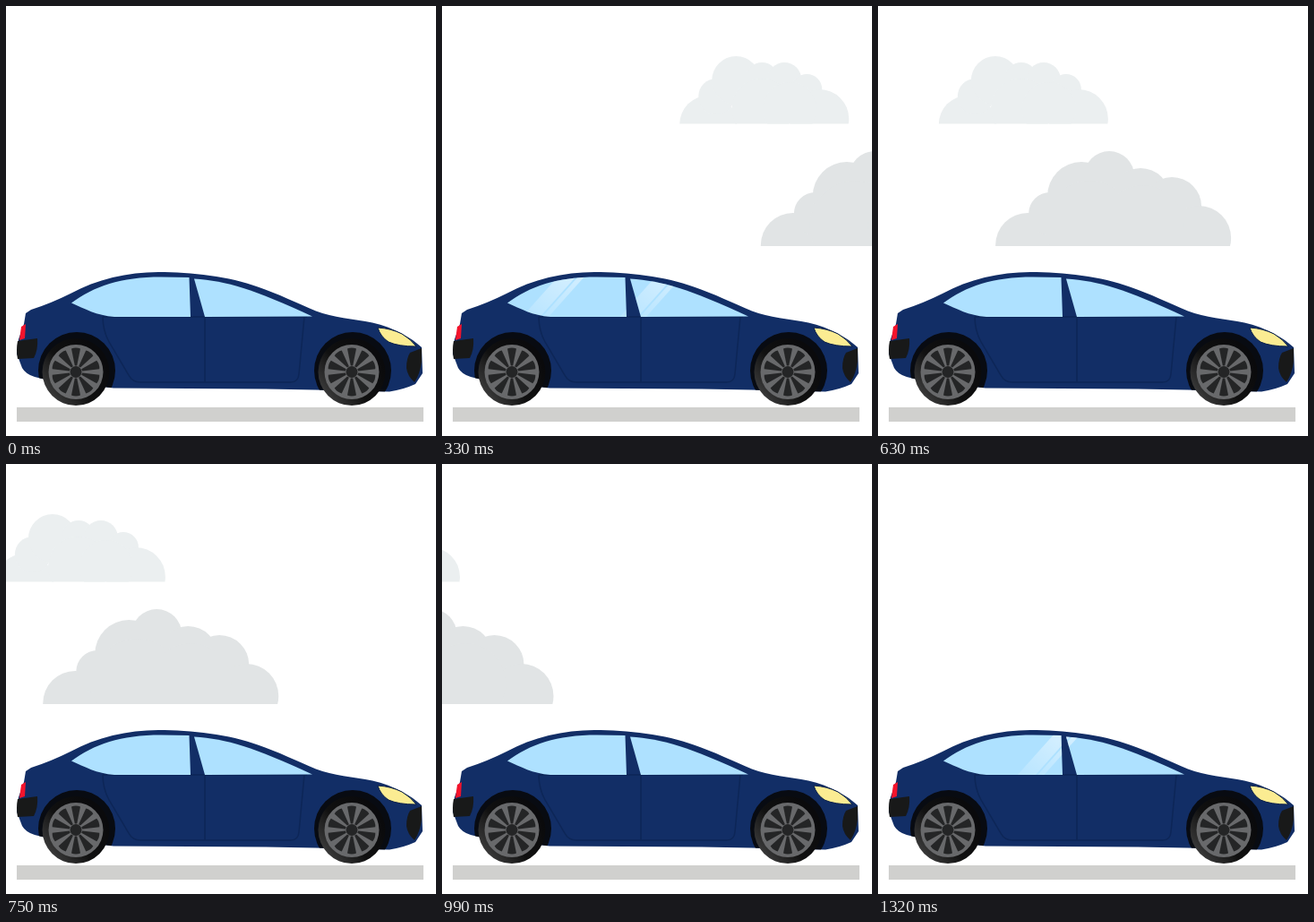
Recreate the animation shown at these times as an HTML page with a canvas. Size 480 px wide and 480 px high, loop 1.35 s.

```html
<!DOCTYPE html>
<html lang="en">
<head>
<meta charset="utf-8">
<title>Car and clouds</title>
<style>
html, body { margin: 0; width: 100%; height: 100%; overflow: hidden; background: #fff; }
canvas { display: block; width: 480px; height: 480px; }
</style>
</head>
<body>
<canvas id="stage" width="480" height="480"></canvas>
<script>
const ctx = document.getElementById('stage').getContext('2d');
const LOOP = 1350, STEP = 30;

const body = new Path2D(`M22 343 L28 339 Q50 332 72 321 C101 305 136 297 170 297
  C207 297 250 302 281 313.5 C303 321 326 332 346 340.5 C365 348 388 349 409 353.5
  C433 359 452 370 464 381 L465 410 L457 422 Q444 428 428 430.5 L345 428.5
  L290 427.5 L120 426.5 L40 416 L32 414 Q22 411 18 404 L12 388 L14 372 L20 355 Z`);
const rearWindow = new Path2D(`M73 331.5 C98 313 128 302.5 173 302.5 L204.5 303 L206 347
  L121 347 C101 345.5 88 338 73 331.5 Z`);
const frontWindow = new Path2D('M210 304.5 C247 307 276 316 342 346.5 L222 347 Z');
const doors = new Path2D(`M108 347 Q108 362 115 375 L137 412 Q141 420 150 420
  L318 420 Q326 420 327 411 L333 347 M222 347 V420 M108 347 H336`);
const rearBumper = new Path2D('M13 374 L35 371 Q36 384 31 393 L13 394 Q11 384 13 374 Z');
const frontBumper = new Path2D('M451 387 L464 382 L464 397 Q462 411 456 420 Q448 413 447 404 Q447 393 451 387 Z');
const tailLight = new Path2D('M15 373 L17 358 L22 355 L21 371 Z');
const headLight = new Path2D('M415 359 Q430 360 442 366 Q452 372 458 380 Q438 380 427 375 Q418 369 415 359 Z');

// Each puff is [x, y, radius], with x measured from the cloud's left edge.
const clouds = [
  { color: '#ebeff0', start: 482.4, speed: 0.658, base: 131.5,
    puffs: [[32, 132, 32], [41, 101, 20], [63, 83, 27], [92, 81, 18], [117, 82, 19],
            [142, 93, 17], [156, 126, 33], [92, 115, 34], [123, 115, 30]] },
  { color: '#e1e4e5', start: 603, speed: 0.749, base: 268,
    puffs: [[36, 267, 36], [61, 232, 24], [96, 212, 38], [127, 190, 28], [162, 214, 33],
            [197, 224, 33], [227, 259, 36], [105, 245, 50], [165, 245, 45]] }
];

function fill(path, color) {
  ctx.fillStyle = color;
  ctx.fill(path);
}

function disc(x, y, r, color) {
  ctx.fillStyle = color;
  ctx.beginPath();
  ctx.arc(x, y, r, 0, Math.PI * 2);
  ctx.fill();
}

function drawCloud({ color, start, speed, base, puffs }, t) {
  const left = start - speed * t;
  ctx.save();
  ctx.beginPath();
  ctx.rect(0, 0, 480, base);
  ctx.clip();
  for (const [x, y, r] of puffs) disc(left + x, y, r, color);
  ctx.restore();
}

// A slanted band of light; x is its centre halfway up the window.
function drawBand(x, width, alpha) {
  const gradient = ctx.createLinearGradient(x - 21, 347, x + 21, 300);
  gradient.addColorStop(0, `rgba(255,255,255,${alpha * 0.3})`);
  gradient.addColorStop(1, `rgba(255,255,255,${alpha})`);
  ctx.fillStyle = gradient;
  ctx.beginPath();
  ctx.moveTo(x - 21 - width / 2, 348);
  ctx.lineTo(x + 21 - width / 2, 301);
  ctx.lineTo(x + 21 + width / 2, 301);
  ctx.lineTo(x - 21 + width / 2, 348);
  ctx.fill();
}

function drawGlare(x, alpha) {
  drawBand(x - 4, 20, alpha);
  drawBand(x + 12, 7, alpha);
}

function drawReflections(t) {
  const panes = new Path2D(rearWindow);
  panes.addPath(frontWindow);
  ctx.save();
  ctx.clip(panes);
  if (t >= 60 && t <= 540) {
    const alpha = 0.45 * Math.min(1, (t - 30) / 90, (570 - t) / 90);
    drawGlare(98 + 0.17 * (t - 180), alpha);
    drawGlare(204 + 0.19 * (t - 180), alpha);
  } else if (t >= 1080) {
    drawGlare(169 + 0.1 * (t - 1110), 0.5);
  }
  ctx.restore();
}

function drawWheel(x, y) {
  const tyre = ctx.createLinearGradient(x - 30, y + 24, x + 25, y - 20);
  tyre.addColorStop(0, '#3a3a3a');
  tyre.addColorStop(0.45, '#101010');
  tyre.addColorStop(1, '#0a0a0c');
  disc(x, y, 37.5, tyre);
  disc(x, y, 30.5, '#68696b');
  ctx.save();
  ctx.translate(x, y);
  ctx.rotate(Math.PI / 10);
  ctx.fillStyle = '#242526';
  for (let i = 0; i < 10; i++) {
    ctx.beginPath();
    ctx.moveTo(7, -1.2);
    ctx.lineTo(26, -5);
    ctx.quadraticCurveTo(28, 0, 26, 5);
    ctx.lineTo(7, 1.2);
    ctx.fill();
    ctx.rotate(Math.PI / 5);
  }
  ctx.restore();
  disc(x, y, 6.5, '#242526');
}

function drawCar(t) {
  fill(body, '#122e66');
  ctx.strokeStyle = '#0d2657';
  ctx.lineWidth = 1.5;
  ctx.stroke(doors);
  fill(rearWindow, '#aee1ff');
  fill(frontWindow, '#aee1ff');
  drawReflections(t);

  fill(rearBumper, '#181919');
  fill(frontBumper, '#181919');
  fill(tailLight, '#f3142c');
  fill(headLight, '#fbec92');
  ctx.strokeStyle = '#0b2049';
  ctx.lineWidth = 1;
  ctx.stroke(headLight);

  ctx.save();
  ctx.clip(body);
  for (const x of [78, 386]) disc(x + 1, 407, 43, '#080b12');
  ctx.restore();
  for (const x of [78, 386]) drawWheel(x, 408.5);
}

function render(now) {
  const t = Math.floor(now % LOOP / STEP) * STEP;
  ctx.fillStyle = '#fff';
  ctx.fillRect(0, 0, 480, 480);
  for (const cloud of clouds) drawCloud(cloud, t);
  ctx.fillStyle = '#d0d0ce';
  ctx.fillRect(12, 448, 454, 16);
  drawCar(t);
}

let begin;
function tick(now) {
  begin ??= now;
  render(now - begin);
  requestAnimationFrame(tick);
}
render(0);
requestAnimationFrame(tick);
</script>
</body>
</html>
```
